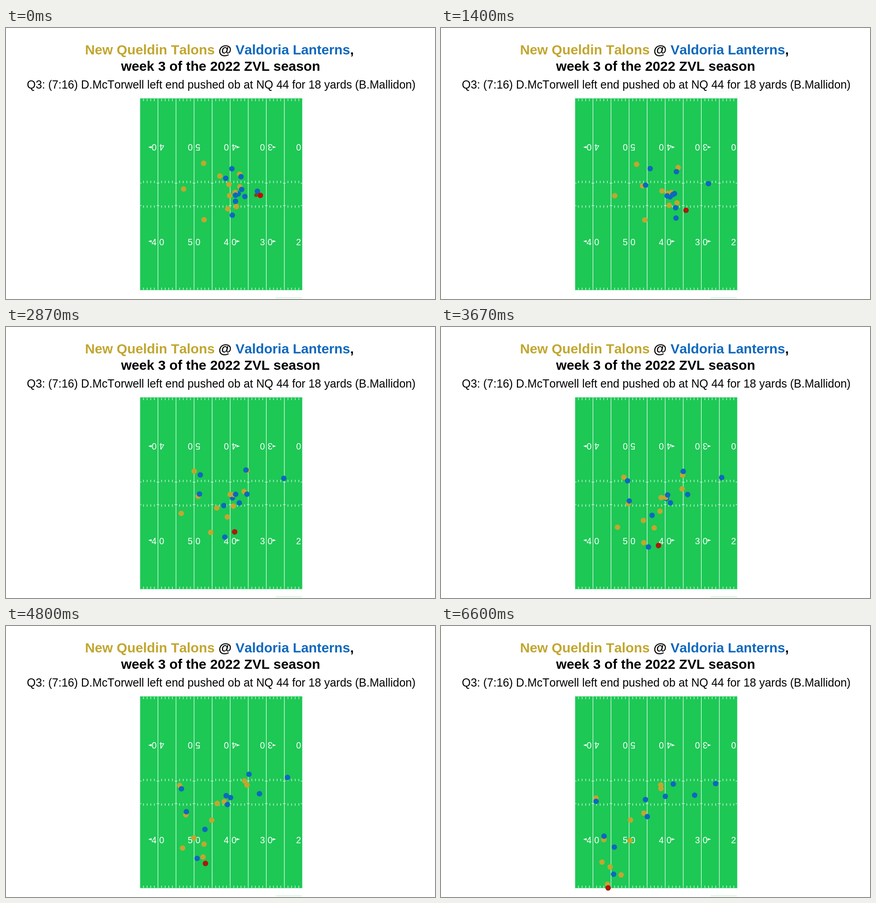
Animation of 942 by 595 pixels, one loop 6670 ms. Source, as an HTML page:

```html
<!DOCTYPE html>
<html lang="en">
<head>
<meta charset="utf-8">
<title>Play animation</title>
<style>
  html, body { margin: 0; width: 100%; height: 100%; overflow: hidden; background: #fff; }
  svg { display: block; width: 100%; height: 100%; }
  text { font-family: "Liberation Sans", Arial, sans-serif; font-kerning: none; }
  .title { font-size: 29.8px; font-weight: bold; }
  .caption { font-size: 24.9px; }
  .yards { font-size: 19.5px; fill: #fff; text-anchor: middle; }
  .gold { fill: #c2a62f; }
  .blue { fill: #0d68be; }
  .red { fill: #c8060c; }
  .ball { fill: #86300f; fill-opacity: .8; }
</style>
</head>
<body>
<svg viewBox="0 0 942 595">
  <text class="title" x="173.5" y="57.5"><tspan class="gold">New Queldin Talons</tspan> @ <tspan class="blue">Valdoria Lanterns</tspan>,</text>
  <text class="title" x="252.8" y="93.5">week 3 of the 2022 ZVL season</text>
  <path d="M592 138.5H650" stroke="#eef5f0"/>
  <text class="caption" x="45.8" y="133">Q3: (7:16) D.McTorwell left end pushed ob at NQ 44 for 18 yards (B.Mallidon)</text>
  <path d="M592 592.5H650" stroke="#b4ecc8"/>
  <rect x="294.5" y="154.5" width="356" height="421" fill="#1dc855" stroke="#8fe3ac"/>
  <path id="lines" stroke="#fff" stroke-width="1.1"/>
  <g id="numbers"></g>
  <g id="players"></g>
</svg>
<script>
const $ = id => document.getElementById(id);
const LEFT = 294, YARD = 7.93;

// Field markings: a full line every five yards, short ticks between
let d = 'M294.5 340.5h3M294.5 390h3M647 340.5h3M647 390h3';
for (let yard = 1; yard < 45; yard++) {
  const x = LEFT + yard * YARD;
  d += yard % 5
    ? [155.5, 335.5, 389.5, 570].map(y => `M${x} ${y}v5`).join('')
    : `M${x} 155V575M${x - 3} 340.5h6M${x - 3} 390h6`;
}
$('lines').setAttribute('d', d);

const digit = (value, x) => `<text class="yards" x="${x}" y="7">${value}</text>`;

[4, 5, 4, 3, 2].forEach((tens, k) => {
  const x = LEFT + YARD * (5 + 10 * k), side = k ? 1 : -1, cut = k === 4;
  const arrow = y => tens === 5 || cut ? ''
    : `<path fill="#fff" d="M${x + side * 21.5} ${y}l${-side * 7.5} -2.6v5.2z"/>`;
  $('numbers').innerHTML +=
    `<g transform="translate(${x} 470)">${digit(tens, -8.5)}${cut ? '' : digit(0, 8.4)}</g>` +
    `<g transform="translate(${x} 261.5) rotate(180)">${cut ? '' : digit(tens, -8.5)}${digit(0, 8.4)}</g>` +
    arrow(261.7) + arrow(468.3);
});

// Polynomial through values spread evenly over the play, u from 0 to 1
function through(values, u) {
  const n = values.length - 1;
  return values.reduce((sum, value, i) => {
    for (let j = 0; j <= n; j++) if (j !== i) value *= (u * n - j) / (i - j);
    return sum + value;
  }, 0);
}

const PLAY = 6600;
const dots = [];

function dot(kind, place, r = 6) {
  const el = document.createElementNS('http://www.w3.org/2000/svg', 'circle');
  el.setAttribute('class', kind);
  el.setAttribute('r', r);
  $('players').append(el);
  dots.push({ el, place });
}

// A route through a few points
const route = (...xy) => {
  const xs = xy.filter((_, i) => i % 2 === 0), ys = xy.filter((_, i) => i % 2);
  return t => [through(xs, t / PLAY), through(ys, t / PLAY)];
};

// Stays with a leader while the gap eases from its first size to its last
const follow = (leader, [x0, y0], [x1, y1], ease) => t => {
  const [x, y] = leader(t), k = Math.exp(-t / ease);
  return [x + x1 + (x0 - x1) * k, y + y1 + (y0 - y1) * k];
};

const wideOut = route(496, 309, 441, 316, 394, 350.5, 340.5, 385);
const tightEnd = route(482.5, 330, 435, 356, 402.5, 398, 358, 461.5);
const runner = route(558.5, 367.5, 520, 426, 452.5, 507, 367, 575);

dot('blue', route(510, 364, 496, 376, 492.5, 374));

// Defence
dot('gold', follow(wideOut, [-62, -12], [2, -7], 2000));
dot('gold', follow(tightEnd, [-13, -5], [0, 8], 2000));
dot('gold', route(513, 321, 526, 309, 527.5, 335, 482.5, 349));
dot('gold', route(513.5, 348.5, 516, 364, 531, 351, 483, 357));
dot('gold', route(491, 368, 488, 371, 416, 426));
dot('gold', route(503, 361, 497, 371, 445.5, 411));
dot('gold', route(489.5, 343.5, 475, 377, 424.5, 451, 353.5, 518.5));
dot('gold', route(506, 392, 511, 387, 462, 418, 415, 471));
dot('gold', route(487, 397, 496, 401, 447.5, 465.5, 371.5, 529));
dot('gold', route(390, 353.5, 382.5, 388, 388.5, 470, 365.5, 567));
dot('gold', route(435, 421, 450, 435, 438, 495.5, 395.5, 546.5));

// Offence
dot('blue', wideOut);
dot('blue', tightEnd);
dot('blue', route(516, 326.5, 522, 313.5, 534, 322, 510, 347));
dot('blue', route(517.5, 354.5, 520, 366, 552, 368, 557, 371.5));
dot('blue', route(552, 358.5, 614, 331, 603, 346));
dot('blue', route(504, 367, 501, 368, 449, 381));
dot('blue', route(504, 380.5, 488, 378, 447, 435, 380.5, 485.5));
dot('blue', route(497, 411, 516, 389, 493, 389, 453, 418.5));
dot('blue', route(524.5, 370, 499, 442, 432, 501, 379, 545));
dot('red', runner);
dot('ball', follow(runner, [-9.5, -.5], [-.5, 2], 250), 4);

const LOOP = 6670, STEP = 200 / 3;
const start = performance.now();

function draw() {
  const t = (performance.now() - start) % LOOP;
  // Fifteen pictures a second; the offset allows for delays rounded to 10 ms
  const time = Math.min(Math.floor((t + 3.4) / STEP) * STEP, PLAY);
  for (const { el, place } of dots) {
    const [x, y] = place(time);
    el.setAttribute('cx', x.toFixed(2));
    el.setAttribute('cy', y.toFixed(2));
  }
  requestAnimationFrame(draw);
}
draw();
</script>
</body>
</html>
```
